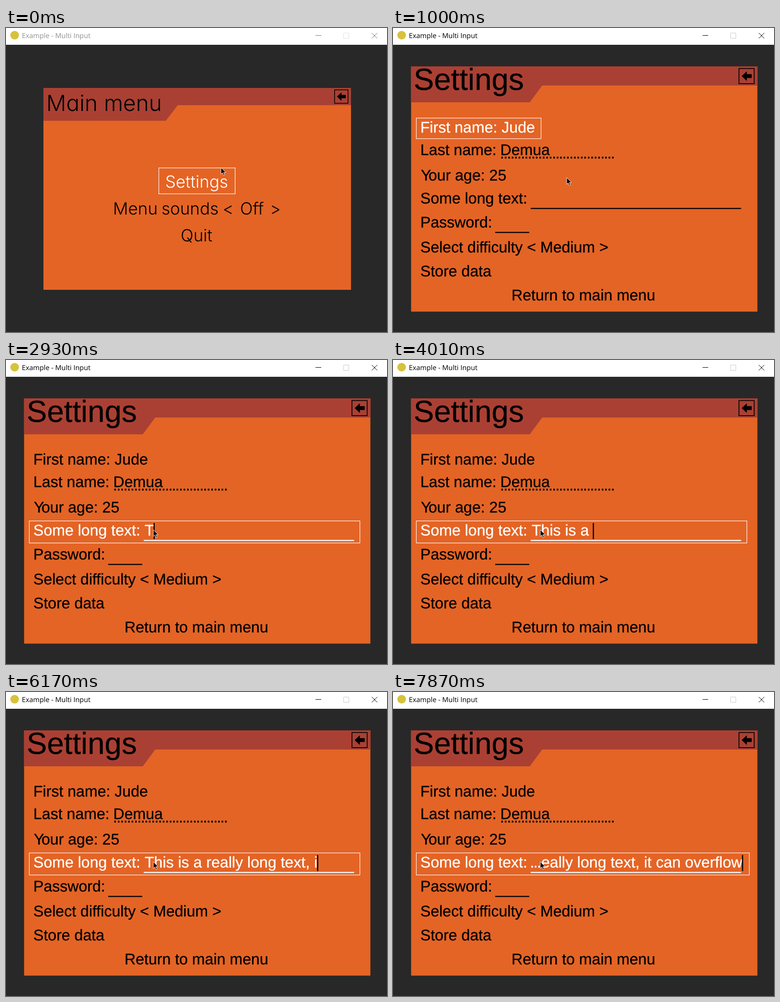
Write an HTML page that moves like this. It is 794 px wide and 634 px high and loops after 8000 ms.

```html
<!DOCTYPE html>
<html lang="en">
<head>
<meta charset="utf-8">
<title>Example - Multi Input</title>
<style>
  html, body { margin: 0; width: 100%; height: 100%; overflow: hidden; background: #282828; }
  svg { display: block; width: 794px; height: 634px; color: #000; fill: currentColor; }
  text { white-space: pre; text-rendering: geometricPrecision; font-kerning: none; }
  #bar text { font: 14.4px "Open Sans", sans-serif; }
  #main text { font: 350 35px Inter, sans-serif; font-feature-settings: "cv11"; text-anchor: middle; }
  #main .title { font-size: 46px; }
  #settings text { font: 32.1px "Liberation Sans", Arial, sans-serif; stroke: currentColor; stroke-width: .3; }
  #settings .title { font-size: 63.6px; }
  #settings .dots { letter-spacing: -1.7px; }
  .on { color: #fff; }
  .frame { fill: none; stroke: #fff; stroke-width: 1.1; }
</style>
</head>
<body>
<svg viewBox="0 0 794 634" xmlns="http://www.w3.org/2000/svg">
  <defs>
    <g id="back">
      <rect width="28" height="28" fill="none" stroke="#000" stroke-width="1.5"/>
      <path d="M5 14 L14.5 5 V10.5 H23.5 V17.5 H14.5 V23 Z"/>
    </g>
  </defs>
  <rect width="794" height="634" fill="#282828"/>

  <g id="bar">
    <rect width="794" height="35" fill="#fff"/>
    <circle cx="18" cy="15" r="9" fill="#d6c23c"/>
    <text x="33" y="21">Example - Multi Input</text>
    <g fill="none">
      <path id="max" d="M703.5 10.5 h11 v11 h-11 Z"/>
      <path id="ctl" d="M645 15.5 h12 M762.3 10.3 l11.4 11.4 m0 -11.4 l-11.4 11.4"/>
    </g>
  </g>

  <g id="main">
    <path d="M78 125 H719 V546 H78 Z" fill="#e46425"/>
    <path d="M78 125 H719 V161 H358 L333 193.5 H78 Z" fill="#aa4033"/>
    <text class="title" x="204.5" y="173">Main menu</text>
    <use href="#back" x="684.7" y="129"/>
    <rect class="frame" x="318.5" y="291.8" width="159" height="54"/>
    <text class="on" x="397.3" y="333">Settings</text>
    <text x="269.5" y="389">Menu</text>
    <text x="383.5" y="389">sounds</text>
    <text x="463" y="389">&lt;</text>
    <text x="512.5" y="389">Off</text>
    <text x="561.5" y="389">&gt;</text>
    <text x="397" y="445">Quit</text>
  </g>

  <g id="settings">
    <path d="M37.7 80 H759.4 V591.4 H37.7 Z" fill="#e46425"/>
    <path d="M37.7 80 H759.4 V120 H311 L285 155 H37.7 Z" fill="#aa4033"/>
    <text class="title" x="43" y="129">Settings</text>
    <use href="#back" transform="translate(721 84.5) scale(1.13)"/>
    <text id="first" x="57" y="218">First name: Jude</text>
    <text x="57" y="265">Last name:</text>
    <text x="223.5" y="265">Demua</text>
    <text id="leader" class="dots" x="223" y="272"></text>
    <text x="58" y="318">Y</text>
    <text x="74" y="318">our age: 25</text>
    <g id="long">
      <text id="label" x="57" y="366">Some long text: </text>
      <text id="more" class="dots" x="285.5" y="366">...</text>
      <text id="value" y="366"></text>
      <rect x="287" y="375.2" width="438.5" height="2.3"/>
    </g>
    <text x="57" y="415.5">Password:</text>
    <rect x="213" y="425.2" width="71" height="2.3"/>
    <text x="57" y="468">Select difficulty &lt; Medium &gt;</text>
    <text x="57" y="518">Store data</text>
    <text x="247" y="568">Return to main menu</text>
    <rect id="box" class="frame" x="48.5"/>
    <rect id="caret" width="2.4" height="33.5"/>
  </g>

  <circle id="halo" r="15.5" fill="#f1ac12" opacity=".94"/>
  <path id="mouse" d="M0 0 V14 L3.2 11.1 L5.5 16.4 L7.8 15.4 L5.5 10.3 H10 Z" stroke-width=".9"/>
</svg>
<script>
const LOOP = 8000, FRAME = 77.1, LEAD = 8;
const PRESS = 770, OPEN = 1000, CARET = 1390, PRESS2 = 2230, SELECT = 2310, RELEASE2 = 2390;
const SIZE = 32.1, LIMIT = 422;
const PHRASE = "This is a really long text, it can overflow";

// pointer legs: start and end time, bend, end point
const HOME = [448, 291];
const LEGS = [
  { from: 0, to: 150, bend: [428, 292], end: [406, 296] },
  { from: 300, to: 620, bend: [385, 300], end: [362, 312] },
  { from: 1160, to: 1850, bend: [240, 262], end: [316, 266] },
  { from: 1850, to: 2110, bend: [311, 310], end: [307, 354] }
];
// typing pace: [time, characters], even in between
const PACE = [[2850, 1], [4010, 10], [4640, 17], [5230, 24], [6090, 29], [6630, 34], [7790, 43]];

const $ = id => document.getElementById(id);
const set = (el, attrs) => { for (const k in attrs) el.setAttribute(k, attrs[k]); };
const show = (el, on) => { el.style.display = on ? "" : "none"; };
const clamp = v => Math.min(1, Math.max(0, v));

const pen = document.createElement("canvas").getContext("2d");
pen.font = '321px "Liberation Sans", Arial, sans-serif';
pen.fontKerning = "none";
const width = s => pen.measureText(s).width * SIZE / 321;

const title = document.querySelector("#bar text");
const fieldX = 57 + width($("label").textContent);
$("leader").textContent = ".".repeat(33);

function pointer(t) {
  let at = HOME;
  for (const { from, to, bend, end } of LEGS) {
    const s = clamp((t - from) / (to - from)), r = 1 - s;
    at = at.map((p, i) => r * r * p + 2 * r * s * bend[i] + s * s * end[i]);
  }
  return at;
}

function typedCount(t) {
  if (t < PACE[0][0]) return 0;
  let n = PACE[0][1];
  for (let i = 1; i < PACE.length; i++) {
    const [t0, n0] = PACE[i - 1], [t1, n1] = PACE[i];
    n += (n1 - n0) * clamp((t - t0) / (t1 - t0));
  }
  return Math.floor(n + .12);
}

function drawBar(focused) {
  set(title, { fill: focused ? "#000" : "#929292" });
  set($("ctl"), { stroke: focused ? "#000" : "#777" });
  set($("max"), { stroke: focused ? "#ccc" : "#e2e2e2" });
}

function drawForm(t) {
  const editing = t >= SELECT;
  const typed = PHRASE.slice(0, typedCount(t));
  let shown = typed;
  while (width(shown) > LIMIT) shown = shown.slice(1);
  const cut = shown !== typed;
  const left = fieldX + (cut ? 20 : 0);

  set($("first"), { class: editing ? "" : "on" });
  set($("long"), { class: editing ? "on" : "" });
  show($("more"), cut);
  set($("value"), { x: left });
  $("value").textContent = shown;

  if (editing) {
    set($("box"), { y: 335.6, width: typed.includes("can ") ? 694 : 689, height: 46 });
    set($("caret"), { x: left + width(shown) - 1, y: 340 });
  } else {
    set($("box"), { y: 187.8, width: 260, height: 43 });
    set($("caret"), { x: 295.8, y: 192.5 });
  }
  show($("caret"), t >= CARET);
}

function drawMouse(t) {
  const [x, y] = pointer(t).map(Math.round);
  const down = t >= PRESS && t < OPEN || t >= PRESS2 && t < RELEASE2;
  show($("halo"), down);
  set($("halo"), { cx: x, cy: y });
  set($("mouse"), {
    transform: `translate(${x} ${y})`,
    fill: down ? "#3c3a08" : "#000",
    stroke: down ? "#f0dc60" : "#fff"
  });
}

function draw(t) {
  drawBar(t >= PRESS);
  show($("main"), t < OPEN);
  show($("settings"), t >= OPEN);
  if (t >= OPEN) drawForm(t);
  drawMouse(t);
}

const start = performance.now();
function tick() {
  const t = (performance.now() - start) % LOOP;
  draw(Math.floor((t + LEAD) / FRAME) * FRAME);
  requestAnimationFrame(tick);
}
tick();
</script>
</body>
</html>
```
